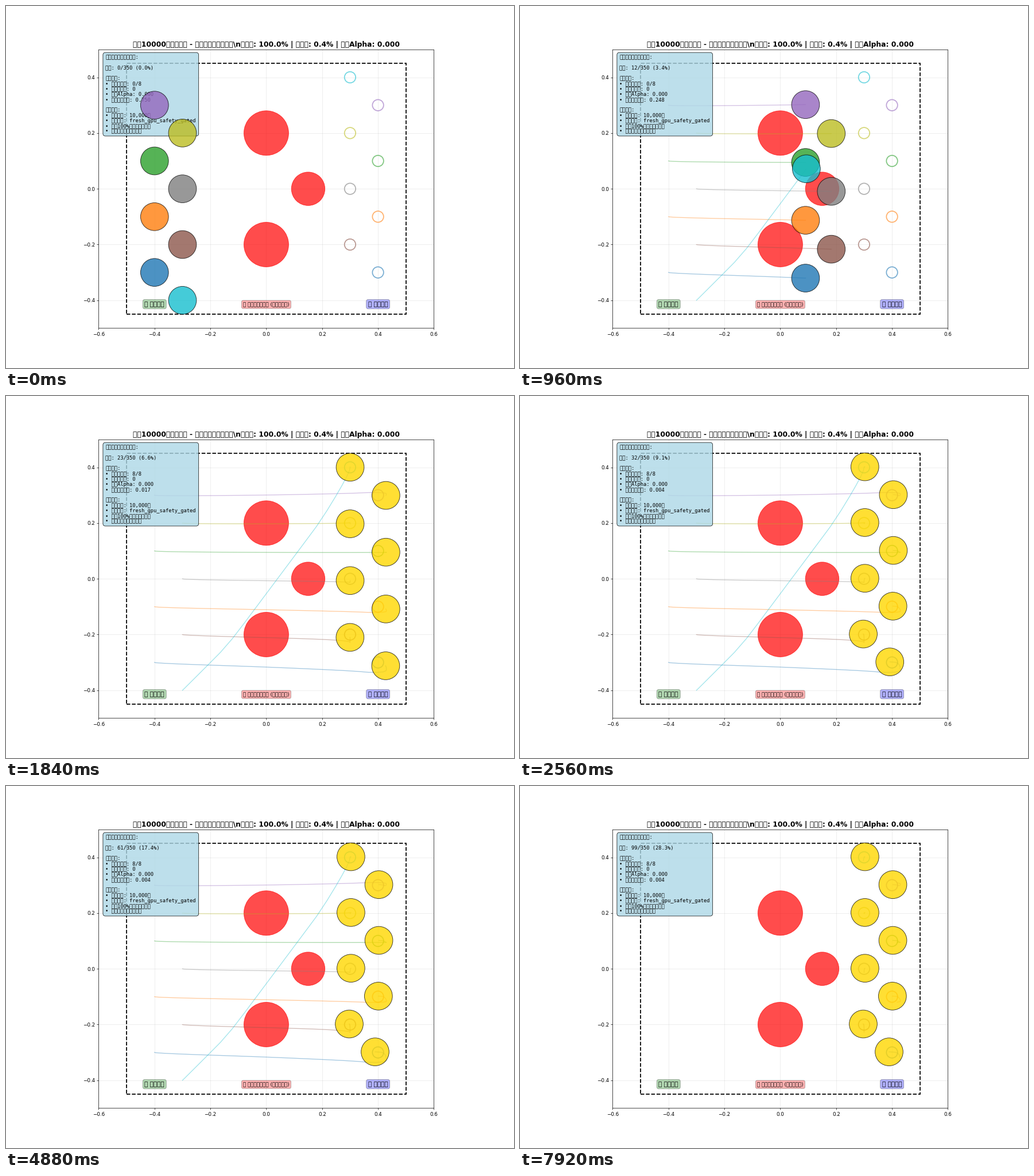
A matplotlib script that plays this animation: 885x632 px, repeating every 8 s.

```python
import numpy as np
import matplotlib.pyplot as plt
from matplotlib.animation import FuncAnimation
from matplotlib.patches import Circle, FancyBboxPatch, Rectangle
from matplotlib.transforms import IdentityTransform

WIDTH, HEIGHT, DPI = 885, 632, 63.2
FRAMES, INTERVAL = 100, 80
TOTAL_STEPS, TRAIL_STEPS = 350, 80
REACHED = 0.1
ALERT_AGENT, ALERT_STEPS = 2, range(7, 10)

ACCELERATION = .00758
AXIS_SPEED, TOTAL_SPEED = .062, .0715
BRAKE_STEPS = 6

plt.rcParams["font.family"] = "DejaVu Sans"

# Two staggered columns, mirrored from left to right; the last agent crosses
GOALS = np.array([(.4 - .1 * col, -.3 + .1 * col + .2 * row)
                  for col in range(2) for row in range(4)])
STARTS = GOALS * (-1, 1)
STARTS[-1, 1] *= -1
COLORS = plt.cm.tab10(np.linspace(0, 1, len(STARTS)))


def smooth(u):
    u = np.clip(u, 0, 1)
    return u * u * (3 - 2 * u)


def glide(t, distance, speed):
    """Distance covered when speeding up, cruising and braking to a stop."""
    speed = np.maximum(speed, 1e-9)
    ramp = speed / ACCELERATION
    cruise = distance / speed - (ramp + BRAKE_STEPS) / 2
    braking = np.clip(t - ramp - cruise, 0, BRAKE_STEPS)
    return (ACCELERATION * np.minimum(t, ramp) ** 2 / 2
            + speed * np.clip(t - ramp, 0, cruise)
            + speed * (braking - braking ** 2 / (2 * BRAKE_STEPS)))


def agent_paths():
    """Positions indexed by step, agent and axis."""
    t = np.arange(FRAMES)[:, None, None]
    travel = GOALS - STARTS
    direction = travel / np.linalg.norm(travel, axis=1, keepdims=True)
    speed = np.minimum(AXIS_SPEED, TOTAL_SPEED * direction)
    lane = GOALS[:, 1:]

    # Long runs overshoot sideways, then settle close to the goal
    overshoot = .15 * (travel - .6) * (1, 0)
    rest = np.hstack([.003 - .15 * np.minimum(lane, 0) ** 2,
                      np.full_like(lane, .002)])
    settle = smooth((t - 21) / 13)

    # Straight runs sag and spread apart on the way
    swing = np.minimum(t / 17, 1) * (1 - smooth((t - 18) / 10))
    drift = (.075 * lane * swing ** 2 - .013 * swing) * (1 - direction[:, 1:])

    return (STARTS + glide(t, travel + overshoot, speed)
            + settle * (rest - overshoot) + drift * (0, 1))


paths = agent_paths()
distances = np.linalg.norm(paths - GOALS, axis=2)

# A tiny margin keeps the pixel size from being rounded down
fig, ax = plt.subplots(
    figsize=((WIDTH + 1e-4) / DPI, (HEIGHT + 1e-4) / DPI), dpi=DPI)
fig.subplots_adjust(left=.1247)
ax.set_xlim(-.6, .6)
ax.set_ylim(-.5, .5)
ax.set_aspect("equal")
ax.set_axisbelow(True)
ax.grid(True, alpha=.3)
ax.set_title("基于10000步训练模型 - 智能体协同避障演示\\n"
             "成功率: 100.0% | 碰撞率: 0.4% | 平均Alpha: 0.000",
             fontsize=14, fontweight="bold")

ax.add_patch(Rectangle((-.5, -.45), 1, .9, fill=False, lw=2, ls="--"))
for x, y, r in [(0, -.2, .08), (0, .2, .08), (.15, 0, .06)]:
    ax.add_patch(Circle((x, y), r, color="red", alpha=.7))
for goal, color in zip(GOALS, COLORS):
    ax.add_patch(Circle(goal, .02, fill=False, ec=color, lw=2, alpha=.6))

for x, label, size, color in [(-.4, "绿 起始区域", 12, "green"),
                              (0, "红 障碍物危险区域 (禁止进入区)", 10, "red"),
                              (.4, "蓝 目标区域", 12, "blue")]:
    ax.text(x, -.42, label, fontsize=size, ha="center",
            bbox=dict(boxstyle="round,pad=0.3", fc=color, alpha=.3))

# Status panel, laid out in pixels
PANEL_X, FIRST_BASELINE, LINE_STEP = 173.3, 92.3, 9.21
pixels = IdentityTransform()
ax.add_patch(FancyBboxPatch((PANEL_X, HEIGHT - 222.6), 157.9, 137,
                            boxstyle="round,pad=4.4", fc="lightblue",
                            ec="black", alpha=.8, zorder=2.9,
                            transform=pixels))
panel = [ax.text(PANEL_X, HEIGHT - FIRST_BASELINE - i * LINE_STEP, "",
                 family="DejaVu Sans Mono", fontsize=10, transform=pixels)
         for i in range(15)]


def panel_lines(step):
    reached = np.sum(distances[step] < REACHED)
    alerts = int(step in ALERT_STEPS)
    return [
        "多智能体导航实时状态:",
        "",
        f"步数: {step}/{TOTAL_STEPS} ({step / TOTAL_STEPS:.1%})",
        "",
        "实时状态:",
        f"• 到达目标数: {reached}/8",
        f"• 碰撞警告数: {alerts}",
        "• 平均Alpha: 0.000",
        f"• 平均目标距离: {distances[step].mean():.3f}",
        "",
        "模型信息:",
        "• 训练步数: 10,000步",
        "• 模型类型: fresh_gpu_safety_gated",
        "• 达到100%任务成功完成率",
        "• 实时安全约束控制演示",
    ]


trails = [ax.plot([], [], color=c, lw=1.5, alpha=.4)[0] for c in COLORS]
agents = [ax.add_patch(Circle(s, .05, fc=c, ec="black", alpha=.8, zorder=10))
          for s, c in zip(STARTS, COLORS)]


def update(step):
    first = max(0, step - TRAIL_STEPS)
    for i, (agent, trail) in enumerate(zip(agents, trails)):
        trail.set_data(*paths[first:step + 1, i].T)
        agent.center = paths[step, i]
        arrived = distances[step, i] < REACHED
        alert = i == ALERT_AGENT and step in ALERT_STEPS
        agent.set_facecolor("gold" if arrived else COLORS[i])
        agent.set_edgecolor("red" if alert else "black")
        agent.set_linewidth(3 if alert else 1)
    for text, line in zip(panel, panel_lines(step)):
        text.set_text(line)
    return agents + trails + panel


anim = FuncAnimation(fig, update, frames=FRAMES, interval=INTERVAL,
                     repeat=True, repeat_delay=0)
plt.show()
```
